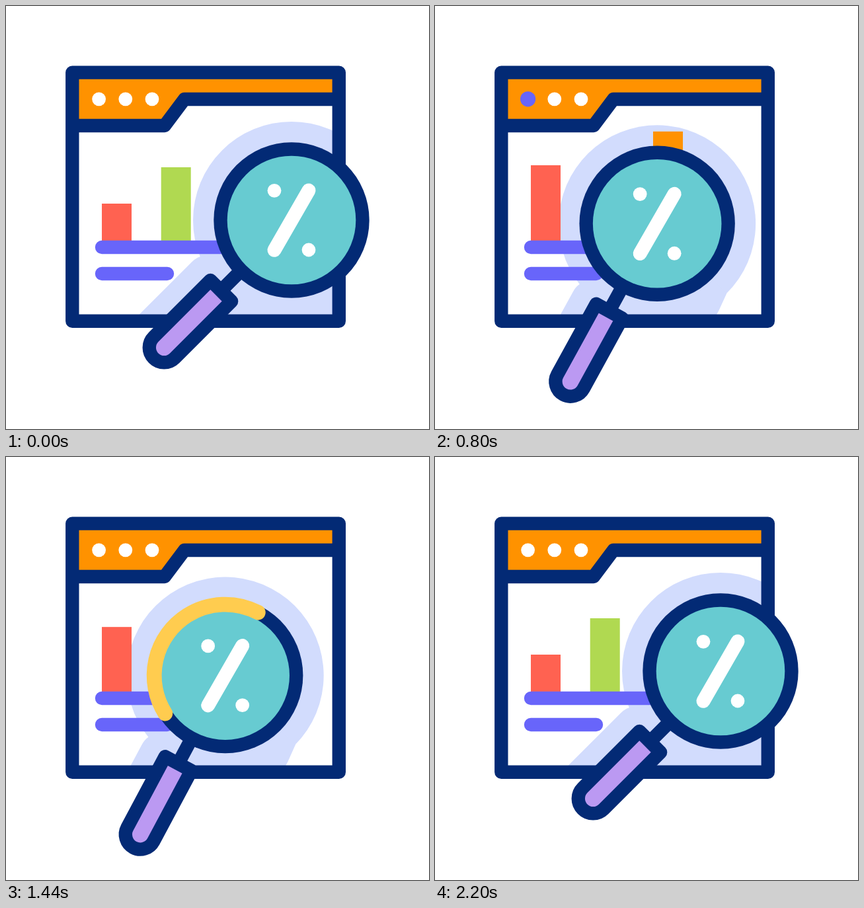
Write an HTML page with a canvas that moves like this. It is 640 px wide and 640 px high and loops after 2440 ms.

```html
<!DOCTYPE html>
<html lang="en">
<head>
<meta charset="utf-8">
<title>Search statistics</title>
<style>
  html, body { margin: 0; width: 100%; height: 100%; overflow: hidden; background: #fff; }
  canvas { display: block; }
</style>
</head>
<body>
<canvas id="stage" width="640" height="640"></canvas>
<script>
const ctx = document.getElementById('stage').getContext('2d');
const NAVY = '#032a75', ORANGE = '#ff9200', VIOLET = '#6865fa', WHITE = '#fff',
  RED = '#ff6251', GREEN = '#b0d951', TEAL = '#67cbd1', LILAC = '#bb99f2',
  YELLOW = '#ffcc4f', SHADE = '#d2dcfd';
const LOOP = 2440, LAST = 2200, STEP = 40, SWING = 520;
const LINE = 20.4, RING = 107.5, RAD = Math.PI / 180;

const clamp = u => Math.max(0, Math.min(1, u));
const mix = (a, b, u) => a + (b - a) * u;
const smooth = s => s * s * (3 - 2 * s);

// Eases in and out; x1 and x2 set how long it lingers at each end
const ease = (x1, x2) => u => {
  let lo = 0, hi = 1;
  for (let i = 0; i < 20; i++) {
    const s = (lo + hi) / 2, r = 1 - s;
    if (3 * r * r * s * x1 + 3 * r * s * s * x2 + s ** 3 < u) lo = s;
    else hi = s;
  }
  return smooth(lo);
};
const during = (t, from, to, easing) => easing(clamp((t - from) / (to - from)));

const rest = { x: 432, y: 324, tilt: 45 };
const right = { x: 450.7, y: 319, tilt: 42.3 };
const left = { x: 314.5, y: 333.6, tilt: 64.8 };
const moves = [
  { a: rest, b: right, from: 0, to: 400, easing: smooth },
  { a: right, b: left, from: 400, to: 1240, easing: ease(0.32, 0.03) },
  { a: left, b: rest, from: 1240, to: 2070, easing: smooth }
];
const sweepHead = ease(0.06, 0.47), sweepTail = ease(0.55, 0.75);

const bars = [
  { x: 145, color: RED, rest: 299, peak: 224, delay: 120 },
  { x: 234.7, color: GREEN, rest: 244, peak: 313.4, delay: 0 },
  { x: 330, color: ORANGE, rest: 299, peak: 188, delay: 240 }
];

// The lens travels between poses on slightly bowed paths
function lensAt(t) {
  const { a, b, from, to, easing } = moves.find(m => t <= m.to) || moves[2];
  const p = during(t, from, to, easing);
  const bow = 0.11 * Math.abs(b.x - a.x) * p * (1 - p);
  return { x: mix(a.x, b.x, p), y: mix(a.y, b.y, p) - bow, tilt: mix(a.tilt, b.tilt, p) };
}

// Each bar swings to its peak and back, twice
function barTop({ rest, peak, delay }, t) {
  const swings = Math.max(0, Math.min(4, (t - delay) / SWING));
  return mix(rest, peak, smooth(1 - Math.abs(1 - swings % 2)));
}

function disc(x, y, r, color) {
  ctx.fillStyle = color;
  ctx.beginPath();
  ctx.arc(x, y, r, 0, 2 * Math.PI);
  ctx.fill();
}

function fill(path, color) {
  ctx.fillStyle = color;
  ctx.fill(new Path2D(path));
}

function stroke(path, color, width = LINE) {
  ctx.strokeStyle = color;
  ctx.lineWidth = width;
  ctx.stroke(new Path2D(path));
}

function placed(lens, turned, draw) {
  ctx.save();
  ctx.translate(lens.x, lens.y);
  if (turned) ctx.rotate((90 - lens.tilt) * RAD);
  draw();
  ctx.restore();
}

function drawPage(t, lens) {
  ctx.save();
  ctx.beginPath();
  ctx.rect(104, 145, 396, 328);
  ctx.clip();
  placed(lens, true, () => {
    disc(0, 0, 149, SHADE);
    fill('M-62 400V152Q-62 131-44 125L0 0L143 42L145 70V400Z', SHADE);
  });
  for (const bar of bars) {
    const y = barTop(bar, t);
    ctx.fillStyle = bar.color;
    ctx.fillRect(bar.x, y, 45, 360 - y);
  }
  stroke('M145 365H385M145 405H244', VIOLET);
  ctx.restore();
}

function drawFrame(t) {
  fill('M100 100H504V141H270L240 181H100Z', ORANGE);
  stroke('M100.3 100.6H503.8V476.8H100.3ZM100.3 181H240L270 141H503.8', NAVY);
  // The three lights turn on and off one after another, three times a loop
  const phase = t % (LAST / 3);
  for (let i = 0; i < 3; i++) {
    const lag = phase - 60 * i, lit = lag > 10 && lag < 350;
    disc(140.6 + 40.2 * i, 140.8, lit ? 11.6 : 10.4, lit ? VIOLET : WHITE);
  }
}

function drawSweep(t) {
  const angle = easing => mix(112, 720, during(t, 880, 1680, easing));
  const head = angle(sweepHead), tail = angle(sweepTail);
  if (head <= tail) return;
  ctx.strokeStyle = YELLOW;
  ctx.lineWidth = 22.8;
  ctx.beginPath();
  ctx.arc(0, 0, RING, tail * RAD, head * RAD);
  ctx.stroke();
}

function drawLens(t, lens) {
  placed(lens, true, () => {
    stroke('M0 110V150', NAVY);
    const grip = 'M-22.5 151H22.5V272.6A22.5 22.5 0 0 1-22.5 272.6Z';
    fill(grip, LILAC);
    stroke(grip, NAVY);
  });
  placed(lens, false, () => {
    disc(0, 0, RING + LINE / 2, NAVY);
    disc(0, 0, RING - LINE / 2, TEAL);
    drawSweep(t);
    disc(-26, -44.7, 10.4, WHITE);
    disc(26, 45, 10.4, WHITE);
    stroke('M26-45L-26 45.3', WHITE, 21);
  });
}

function render(now) {
  const t = Math.min(Math.floor(now % LOOP / STEP) * STEP, LAST);
  const lens = lensAt(t);
  ctx.fillStyle = WHITE;
  ctx.fillRect(0, 0, 640, 640);
  ctx.lineCap = ctx.lineJoin = 'round';
  drawPage(t, lens);
  drawFrame(t);
  drawLens(t, lens);
}

const start = performance.now();
function tick() {
  render(performance.now() - start);
  requestAnimationFrame(tick);
}
tick();
</script>
</body>
</html>
```
